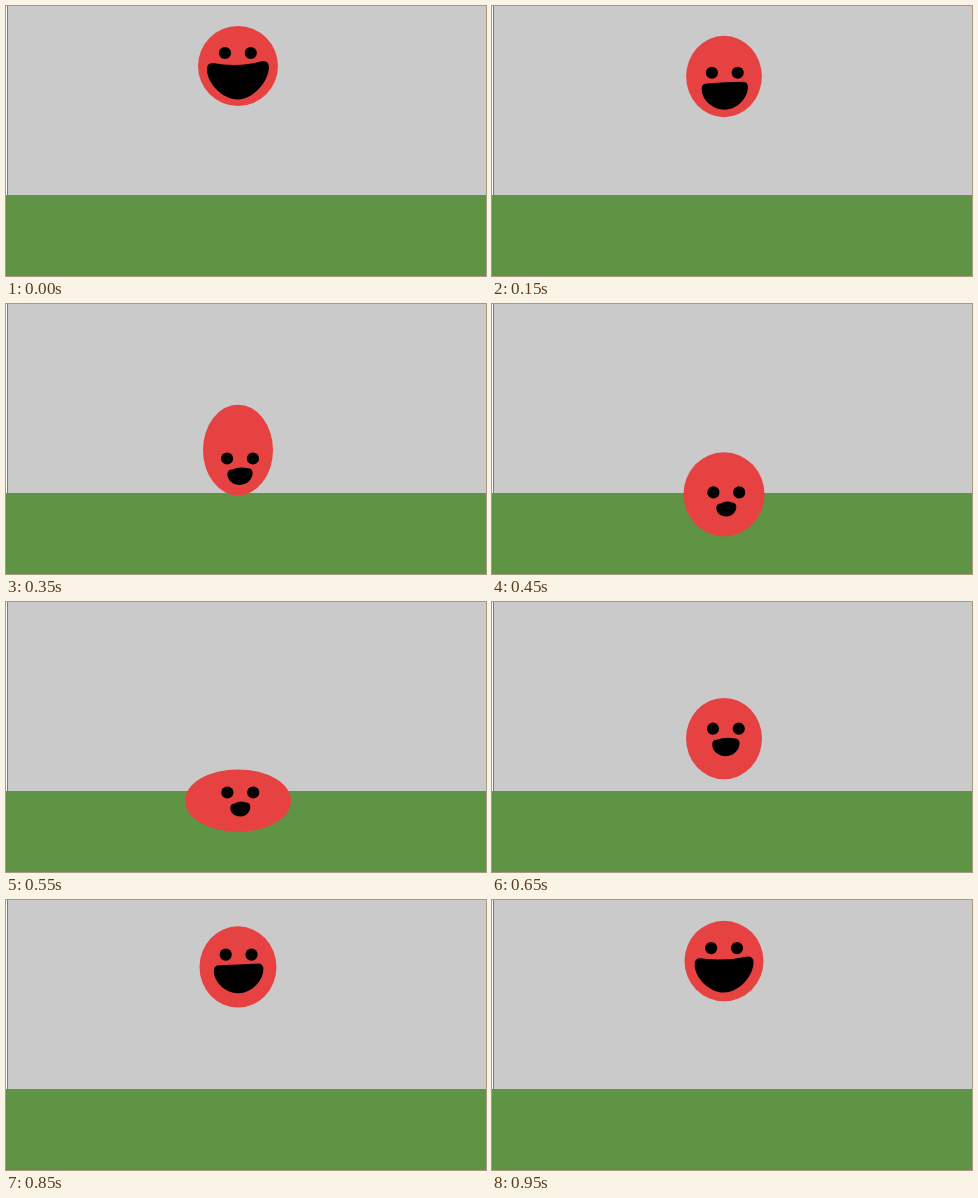
Animation of 480x270 px, one loop 1 s. Source, as an HTML page:

```html
<!DOCTYPE html>
<html lang="en">
<head>
<meta charset="utf-8">
<title>Bouncing ball</title>
<style>
  html, body { margin: 0; width: 100%; height: 100%; overflow: hidden; }
  svg { display: block; width: 100%; height: 100%; }
</style>
</head>
<body>
<svg viewBox="0 0 480 270">
  <rect width="480" height="270" fill="#cacaca"/>
  <rect width="1" height="189" fill="#fff"/>
  <rect x="1" width="1" height="189" fill="#7a7a7a"/>
  <rect y="189" width="480" height="81" fill="#5e9443"/>
  <ellipse id="ball" cx="232" fill="#e64242"/>
  <circle id="eyeL" r="6.1"/>
  <circle id="eyeR" r="6.1"/>
  <path id="mouth"/>
</svg>
<script>
const LOOP = 1000, STEP = 50;
const HIT = 400, SQUASH = 550, REBOUND = 750;
const get = id => document.getElementById(id);
const ball = get('ball'), eyeL = get('eyeL'), eyeR = get('eyeR'), mouth = get('mouth');

const mix = (a, b, u) => a + (b - a) * u;
const linear = u => u;
const easeIn = p => u => u ** p;
const easeOut = p => u => 1 - (1 - u) ** p;
const smooth = u => u * u * (3 - 2 * u);

// Ball centre and radii, and the height of the eyes
const rest = { cy: 60, rx: 40, ry: 40, eye: 47 };
const hit = { cy: 179.8, rx: 34.3, ry: 47.5, eye: 187.4 };
const squash = { cy: 198.7, rx: 53, ry: 31.3, eye: 190.5 };
const rebound = { cy: 77, rx: 37.5, ry: 41, eye: 65.5 };

const fall = easeIn(2.48), launch = easeOut(1.03), unsquash = easeOut(5), rise = easeOut(1.75);
const phases = [
  { start: 0, end: HIT, from: rest, to: hit, ease: { cy: fall, ry: fall, eye: easeIn(2) } },
  { start: HIT, end: SQUASH, from: hit, to: squash, ease: { cy: easeOut(2) } },
  { start: SQUASH, end: REBOUND, from: squash, to: rebound,
    ease: { cy: launch, eye: launch, rx: unsquash, ry: unsquash } },
  { start: REBOUND, end: LOOP, from: rebound, to: rest, ease: { cy: rise, eye: rise } }
];

function poseAt(t) {
  const { start, end, from, to, ease } = phases.find(p => t < p.end);
  const u = (t - start) / (end - start);
  const pose = {};
  for (const key in from) pose[key] = mix(from[key], to[key], (ease[key] || linear)(u));
  return pose;
}

// 1 is the wide grin, 0 the small mouth
function openness(t) {
  if (t < HIT) return 1 - t / HIT;
  if (t < SQUASH) return 0;
  const u = (t - SQUASH) / (LOOP - SQUASH);
  return (u + smooth(u)) / 2;
}

function mouthPath(x, eye, open) {
  const grin = open ** 3;
  const w = mix(10, 31, open), h = mix(15, 34.5, open), r = mix(4.5, 6, open);
  const top = eye + mix(9, 12, grin), bottom = top + h;
  const l = x - w, right = x + w;
  const yl = top + mix(2, -2, grin), yr = yl - mix(1, 2, open);
  const dip = 2 * top - (yl + yr) / 2;
  const side = h * 0.6, curve = w * mix(0.6, 0.48, open);
  return `M${l} ${yl + r}Q${l} ${yl} ${l + r} ${yl}` +
    `Q${x} ${dip} ${right - r} ${yr}Q${right} ${yr} ${right} ${yr + r}` +
    `C${right} ${yr + side} ${x + curve} ${bottom} ${x} ${bottom}` +
    `C${x - curve} ${bottom} ${l} ${yl + side} ${l} ${yl + r}Z`;
}

function set(el, attrs) {
  for (const key in attrs) el.setAttribute(key, attrs[key]);
}

function draw(t) {
  const { cy, rx, ry, eye } = poseAt(t);
  const open = openness(t);
  const x = mix(234.3, 231.9, open);
  set(ball, { cy, rx, ry });
  set(eyeL, { cx: x - 12.9, cy: eye });
  set(eyeR, { cx: x + 12.9, cy: eye });
  set(mouth, { d: mouthPath(x, eye, open) });
}

let start;
function tick(now) {
  start ??= now;
  const t = Math.max(0, now - start) % LOOP;
  draw(Math.floor(t / STEP) * STEP);
  requestAnimationFrame(tick);
}
draw(0);
requestAnimationFrame(tick);
</script>
</body>
</html>
```
